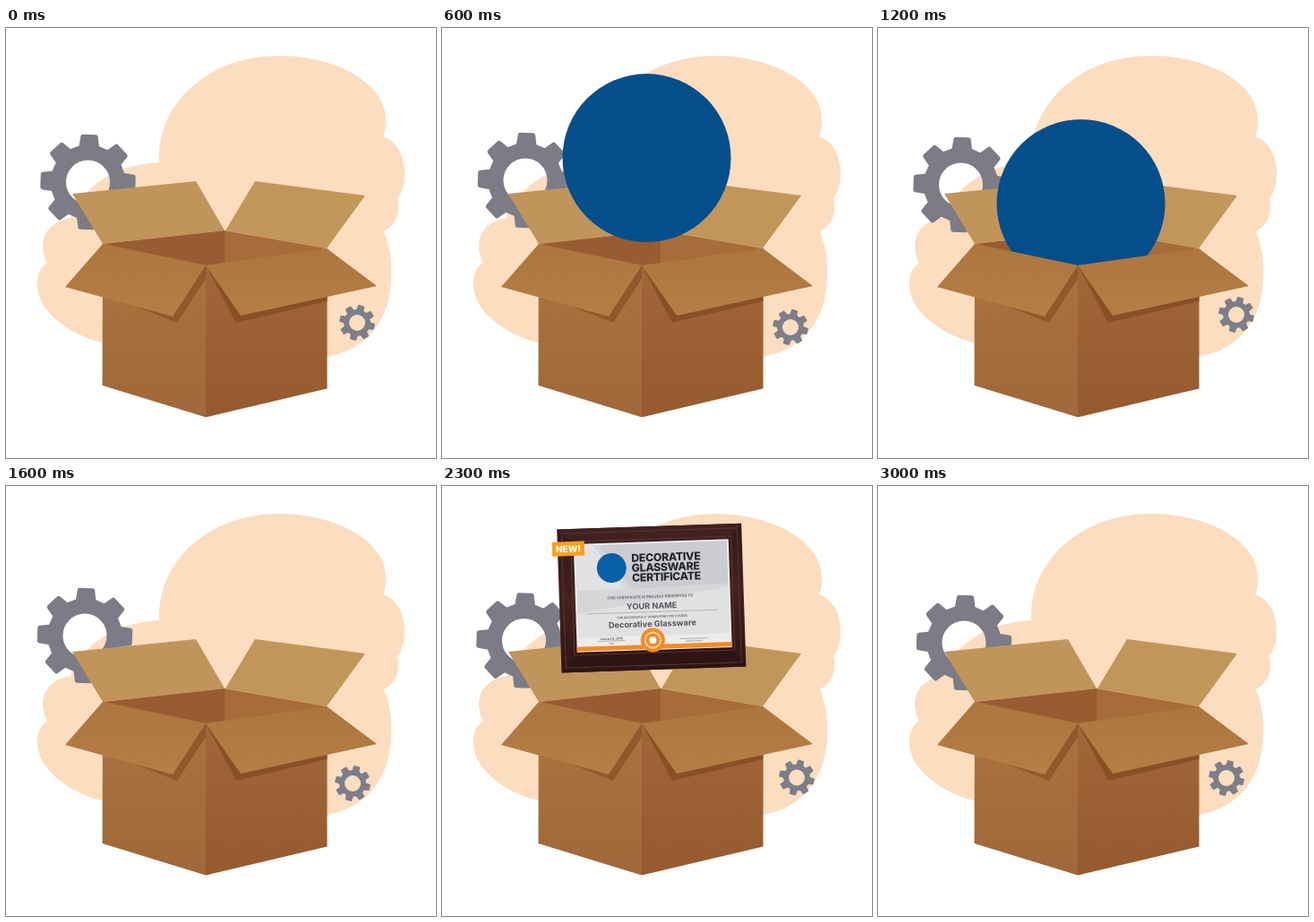
An HTML page that plays this animation: 480 px wide and 480 px high, repeating every 3100 ms.

```html
<!DOCTYPE html>
<html lang="en">
<head>
<meta charset="utf-8">
<title>Open box</title>
<style>
html, body { margin: 0; width: 100%; height: 100%; overflow: hidden; background: #fff; }
svg { display: block; width: 100vw; height: 100vh; }
text { font-family: Inter, "Open Sans", sans-serif; }
.head { font-weight: 800; font-size: 12.2px; letter-spacing: -.25px; fill: #23262b; }
.mid { text-anchor: middle; fill: #55575c; }
</style>
</head>
<body>
<svg viewBox="0 0 480 480">
  <defs>
    <linearGradient id="left" x1="0" y1="0" x2="0" y2="1">
      <stop offset="0" stop-color="#ab743e"/><stop offset="1" stop-color="#a0683a"/>
    </linearGradient>
    <linearGradient id="right" x1="0" y1="0" x2="0" y2="1">
      <stop offset="0" stop-color="#a2673a"/><stop offset="1" stop-color="#965a2f"/>
    </linearGradient>
    <linearGradient id="flap" x1="0" y1="0" x2="0" y2="1">
      <stop offset="0" stop-color="#ad763f"/><stop offset="1" stop-color="#b57e45"/>
    </linearGradient>
    <linearGradient id="wood" x1="0" y1="0" x2="0" y2="1">
      <stop offset="0" stop-color="#321a18"/><stop offset=".5" stop-color="#43221f"/><stop offset="1" stop-color="#2e1614"/>
    </linearGradient>
    <clipPath id="inside">
      <path d="M0 0H480V300H358V402L223 434L108 399V300H0Z"/>
    </clipPath>
  </defs>

  <path fill="#fdddbf" d="M171 150C168 85 225 31 305 31C370 31 426 63 424 104Q424 114 421 121C438 127 445 145 445 162Q445 180 437 190C441 207 435 220 422 227C431 250 432 275 428 298C421 335 396 361 358 367L107 351C82 346 36 322 35 287Q34 270 46 262C36 244 40 217 72 212C82 182 118 152 171 150Z"/>
  <path id="big" fill="#7c7c87" stroke="#7c7c87" stroke-width="5" stroke-linejoin="round" fill-rule="evenodd"/>
  <path id="small" fill="#7c7f89" stroke="#7c7f89" stroke-width="2" stroke-linejoin="round" fill-rule="evenodd"/>

  <path fill="#c0945a" d="M74 185L212 171L244 226L108 241Z"/>
  <path fill="#c2965a" d="M278 171L401 187L358 246L245 226Z"/>
  <path fill="#995c31" d="M108 241L244 226V266L223 270Z"/>
  <path fill="#a66d3b" d="M244 226L358 246L223 270L244 262Z"/>

  <g clip-path="url(#inside)">
    <circle id="disc" r="94" fill="#044f8b"/>
    <g id="cert">
      <rect width="206" height="160" fill="url(#wood)"/>
      <path d="M0 0H206L190 18H19Z" fill="#3f2220"/>
      <path d="M0 160H206L190 138H19Z" fill="#2d1513"/>
      <path d="M5 5H201V155H5ZM15 14H194V141H15Z" fill="none" stroke="#5b3430"/>
      <rect x="18" y="17" width="173" height="121" fill="#f0f0f1"/>
      <rect x="20" y="19" width="169" height="113" fill="#d5d6d8"/>
      <path d="M20 19H46L82 69L189 66V19Z" fill="#cbcccf"/>
      <path d="M20 19H40L74 69H20Z" fill="#e2e2e4"/>
      <path d="M20 95L189 70V132H20Z" fill="#e0e1e2"/>
      <path d="M20 122H189V132H20Z" fill="#ececed"/>
      <rect x="18" y="132" width="173" height="5" fill="#f68a1f"/>
      <circle cx="103" cy="127" r="13.5" fill="#f68a1f"/>
      <circle cx="103" cy="127" r="8.5" fill="none" stroke="#fff" stroke-width="2" stroke-dasharray="1.8 1"/>
      <circle cx="103" cy="127" r="4" fill="#fff"/>
      <circle cx="59.6" cy="45" r="16.5" fill="#0a60a8"/>
      <text class="head" x="82" y="39">DECORATIVE</text>
      <text class="head" x="82" y="50">GLASSWARE</text>
      <text class="head" x="82" y="61">CERTIFICATE</text>
      <text class="mid" x="101.5" y="80" font-size="4.2" font-weight="600">THIS CERTIFICATE IS PROUDLY PRESENTED TO</text>
      <text class="mid" x="103" y="92" font-size="9.2" font-weight="700">YOUR NAME</text>
      <path d="M31 95.5H176" stroke="#a0a1a4" stroke-width=".7"/>
      <text class="mid" x="103" y="102" font-size="3.3" font-weight="600">FOR SUCCESSFULLY COMPLETING THE COURSE</text>
      <text class="mid" x="103" y="112" font-size="9.2" font-weight="700">Decorative Glassware</text>
      <text class="mid" x="57" y="125" font-size="3.2" font-weight="700">January 8, 2020</text>
      <path d="M42 126.5H72M134 126.5H164" stroke="#85868a" stroke-width=".6"/>
      <text class="mid" x="57" y="130" font-size="2.5">Date</text>
      <text class="mid" x="149" y="130" font-size="2.5">Course Director</text>
      <rect x="-6" y="14" width="36" height="16" fill="#f9a01f"/>
      <text x="12" y="25.8" font-size="10" font-weight="800" text-anchor="middle" fill="#fff">NEW!</text>
    </g>
  </g>

  <path fill="url(#left)" d="M108 241L223 265V434.5L107.5 399Z"/>
  <path fill="url(#right)" d="M223 265L358.5 246V402.5L223 434.5Z"/>
  <path fill="#91582c" d="M107.5 296L191 329L223 280V265Z"/>
  <path fill="#8a5025" d="M223 265L257 329L358.5 305V296Z"/>
  <path fill="url(#flap)" d="M108 241L223 265L186 322L66 289Z"/>
  <path fill="url(#flap)" d="M223 265L358 246L414 288L262 321Z"/>
</svg>
<script>
const LOOP = 3100, STEP = 100;
const el = id => document.getElementById(id);

function gear(n, tip, root, hole, turn) {
  const pitch = 2 * Math.PI / n;
  const at = (r, a) => (r * Math.sin(a)).toFixed(2) + ' ' + (-r * Math.cos(a)).toFixed(2);
  const pts = [];
  for (let i = 0; i < n; i++) {
    const a = i * pitch + turn;
    pts.push(at(root, a - pitch * .29), at(tip, a - pitch * .18),
             at(tip, a + pitch * .18), at(root, a + pitch * .29));
  }
  return `M${pts.join('L')}ZM${hole} 0A${hole} ${hole} 0 1 0 ${-hole} 0A${hole} ${hole} 0 1 0 ${hole} 0Z`;
}
el('big').setAttribute('d', gear(8, 51, 39.5, 27, .03));
el('small').setAttribute('d', gear(8, 19, 14, 10, .24));

// The gears drift between a few resting points: time, big x y, small x y
const rests = [
  [0, 91.5, 172, 392, 329], [600, 93, 170, 389, 334], [1200, 92.5, 175, 400, 320],
  [1600, 88, 167, 387, 332], [2000, 90, 174, 397, 326], [2600, 93, 171, 395, 325],
  [3000, 96, 175, 389, 326]
];
rests.push([LOOP, ...rests[0].slice(1)]);

function drift(t) {
  const i = rests.findIndex(r => r[0] > t);
  const a = rests[i - 1], b = rests[i];
  const u = (t - a[0]) / (b[0] - a[0]), k = u * u * (3 - 2 * u);
  return a.map((v, j) => v + (b[j] - v) * k);
}

const move = (id, x, y, turn = 0) =>
  el(id).setAttribute('transform', `translate(${x} ${y}) rotate(${turn})`);

// Depth below the highest point: springs up, hovers, then falls
function depth(s) {
  const up = Math.max(0, (900 - s) / 700), down = Math.max(0, (s - 950) / 250);
  return 210 * up ** 4 + 58 * down ** 2;
}

function pop(id, s, x, y, dx, turn) {
  const d = depth(s);
  el(id).setAttribute('visibility', d < 200 ? 'visible' : 'hidden');
  move(id, x + dx * (s - 600) / 600, y + d, turn);
}

function draw(ms) {
  const t = Math.floor(ms % LOOP / STEP) * STEP;
  const [, bx, by, sx, sy] = drift(t);
  move('big', bx, by);
  move('small', sx, sy);
  pop('disc', t, 228.5, 138, -2, 0);
  pop('cert', t - 1400, 118, 48.5, 20.5, -1.9);
}

const start = performance.now();
function tick() {
  draw(performance.now() - start);
  requestAnimationFrame(tick);
}
tick();
</script>
</body>
</html>
```
